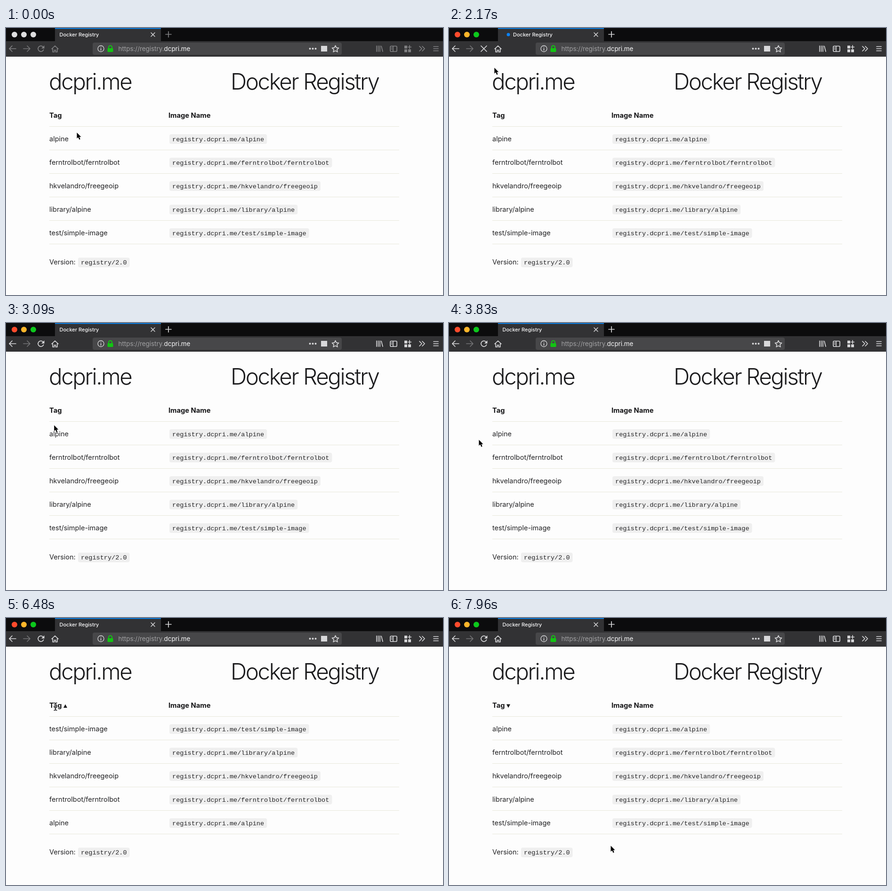
An HTML page for the animation above (8000 ms loop, 928x568 px).

```html
<!DOCTYPE html>
<html lang="en">
<head>
<meta charset="utf-8">
<title>Docker Registry</title>
<style>
  html, body { margin: 0; width: 100%; height: 100%; overflow: hidden; background: #fdfdfd; }
  svg { display: block; font-family: Inter, "Open Sans", sans-serif; font-optical-sizing: none; }
  text { white-space: pre; }
  .title { font-size: 47.5px; font-weight: 300; letter-spacing: -2.4px; fill: #1c1c1e; }
  .body { font-size: 14.5px; fill: #222224; }
  .head { font-size: 14.7px; font-weight: 700; fill: #161618; }
  .code { font: 13.55px "Liberation Mono", monospace; fill: #242426; }
  .pill { fill: #efefef; }
  .line { stroke: #e8e8dc; }
  .icon { fill: none; stroke: #d8d8da; stroke-width: 1.7; stroke-linecap: round; stroke-linejoin: round; }
  .solid { fill: #d8d8da; stroke: none; }
  .tool { color: #d8d8da; }
  .away .tool { color: #808082; }
  .tool .icon { stroke: currentColor; }
  .tool .solid { fill: currentColor; }
  .away .light { fill: #dededf; }
</style>
</head>
<body>
<svg id="stage" width="928" height="568" viewBox="0 0 928 568">
  <rect width="928" height="568" fill="#fdfdfd"/>

  <!-- window chrome -->
  <rect width="928" height="28" fill="#0c0c0d"/>
  <rect y="28" width="928" height="33" fill="#323234"/>
  <rect x="104" width="225" height="28" fill="#323234"/>
  <clipPath id="tab"><rect x="104" y="2" width="225" height="26"/></clipPath>
  <circle id="burst" cx="119" cy="14" fill="#0a84ff" clip-path="url(#tab)"/>
  <rect x="104" width="225" height="2" fill="#0a78d8"/>
  <circle id="throb" cy="14" r="3.5" fill="#0a84ff"/>
  <text id="tabName" y="18" font-size="11" font-weight="500" fill="#f9f9fa">Docker Registry</text>
  <path class="icon" style="stroke-width:1.5" d="M308 10l8 8m0-8l-8 8"/>
  <circle class="light" cx="18" cy="14" r="6" fill="#ff4b2c"/>
  <circle class="light" cx="38" cy="14" r="6" fill="#ffb62a"/>
  <circle class="light" cx="58" cy="14" r="6" fill="#0cc81c"/>

  <!-- toolbar -->
  <rect id="hover" x="60" y="30.5" width="28" height="27" rx="3"/>
  <g class="tool">
    <path class="icon" d="M339 13.500h12M345 7.500v12"/>
    <path class="icon" d="M21 44H7m6-6l-6 6l6 6"/>
    <g id="reload">
      <path class="icon" d="M79.700 46.200A6 6 0 1 1 78.300 39.800"/>
      <path class="solid" d="M81.500 37v6.500H75z"/>
    </g>
    <path class="icon" d="M97 44.500l7-6.500l7 6.500M99.200 44v7h3.300v-4h3v4h3.300v-7"/>
    <path class="icon" d="M787 38v12M790.500 38v12M794 38v12M797 38.500l3 11.500"/>
    <rect class="icon" x="816" y="38.500" width="14" height="11.500" rx="2"/>
    <path class="icon" d="M822 39v11M818.500 42h1M818.500 45h1"/>
    <path class="solid" d="M846 37.500h6v6h-6zM846 45.500h6v6h-6zM854 45.500h6v6h-6z"/>
    <path class="icon" d="M857 37v7M853.700 40.500h6.700"/>
    <path class="icon" d="M878 39l5 5l-5 5M884 39l5 5l-5 5"/>
    <path class="icon" d="M908 39.500h10M908 44h10M908 48.500h10"/>
  </g>
  <path id="forward" class="icon" style="stroke:#737375" d="M37 44h14m-6-6l6 6l-6 6"/>
  <path id="stop" class="icon" d="M68 38l12 12m0-12l-12 12"/>

  <!-- address field -->
  <rect x="184" y="31" width="529" height="26" rx="4" fill="#474749"/>
  <circle class="icon" style="stroke-width:1.300" cx="201.500" cy="44" r="6.500"/>
  <path class="icon" style="stroke-width:1.500" d="M201.500 43.500v4M201.500 40.700v.1"/>
  <rect x="215.500" y="43" width="12" height="8" rx="1.500" fill="#12c412"/>
  <path d="M218 43v-2a3.500 3.500 0 0 1 7 0v2" fill="none" stroke="#12c412" stroke-width="2"/>
  <text x="238.500" y="49" font-size="13.400" fill="#f9f9fa"><tspan fill="#a2a2a4">https://registry.</tspan>dcpri.me</text>
  <g class="solid">
    <circle cx="645.500" cy="44" r="2"/><circle cx="651.500" cy="44" r="2"/><circle cx="657.500" cy="44" r="2"/>
    <rect x="669" y="38" width="13" height="12"/>
  </g>
  <path id="star" class="icon" style="stroke-width:1.600"/>

  <!-- page -->
  <text class="title" x="91" y="130.500">dcpri.me</text>
  <text class="title" x="477" y="130.500">Docker Registry</text>
  <text class="head" x="92" y="191">Tag</text>
  <text class="head" x="345" y="191">Image Name</text>
  <path id="sort" fill="#161618"/>
  <g id="rows"></g>
  <text class="body" x="92" y="503">Version:</text>
  <g id="version"></g>

  <path id="arrow" d="M0 0V12.500L2.900 9.900L5 15L7.300 14L5.200 9.200H9Z" fill="#000" stroke="#fff" stroke-width="1.200" paint-order="stroke" stroke-linejoin="round"/>
  <g id="beam" fill="none">
    <path id="beamEdge" stroke="#fff" stroke-width="3"/>
    <path id="beamCore" stroke="#18181a" stroke-width="1.400"/>
  </g>
</svg>
<script>
const LOOP = 8000;
const FOCUS = 870, PRESS = 1430, LOAD = 1540, DONE = 2455, READY = 3000;
const SORT_DOWN = 4960, SORT_UP = 5520, SORT_DOWN_AGAIN = 6520;
const CHAR = 8.13;
const NS = "http://www.w3.org/2000/svg";
const $ = id => document.getElementById(id);

function add(parent, tag, attrs, text) {
  const el = document.createElementNS(NS, tag);
  for (const k in attrs) el.setAttribute(k, attrs[k]);
  if (text) el.textContent = text;
  return parent.appendChild(el);
}

function addCode(parent, x, y, text) {
  add(parent, "rect", { class: "pill", x, y: y - 14.5, width: text.length * CHAR + 12, height: 20.5, rx: 4 });
  add(parent, "text", { class: "code", x: x + 6, y }, text);
}

const images = ["alpine", "ferntrolbot/ferntrolbot", "hkvelandro/freegeoip", "library/alpine", "test/simple-image"];
const rows = images.map(name => {
  const row = add($("rows"), "g", {});
  add(row, "text", { class: "body", x: 92, y: 240.5 }, name);
  addCode(row, 347, 240.5, "registry.dcpri.me/" + name);
  return row;
});
for (let i = 0; i < 6; i++) {
  add($("stage"), "path", { class: "line", d: `M92 ${209.5 + i * 50}H835` });
}
addCode($("version"), 153, 503, "registry/2.0");

const star = Array.from({ length: 10 }, (_, i) => {
  const r = i % 2 ? 3.6 : 7.5, a = -Math.PI / 2 + i * Math.PI / 5;
  return `${699.5 + r * Math.cos(a)} ${44.8 + r * Math.sin(a)}`;
});
$("star").setAttribute("d", `M${star.join("L")}Z`);

const beam = "M-3.500 -8Q0 -8 0 -5.500Q0 -8 3.500 -8M0 -6V6M-3.500 8Q0 8 0 5.500Q0 8 3.500 8M-2 3H2";
$("beamEdge").setAttribute("d", beam);
$("beamCore").setAttribute("d", beam);
$("stage").append($("arrow"), $("beam"));

// pointer path: time, x, y
const path = [
  [0, 150, 222], [40, 150, 222], [450, 112, 130], [800, 77, 49], [1850, 77, 49],
  [2200, 98, 88], [2520, 124, 139], [3000, 108, 205], [3450, 72, 256], [3830, 63, 248],
  [4250, 70, 205], [4650, 90, 170], [4860, 104, 188], [7300, 104, 188],
  [7600, 215, 345], [7920, 343, 484], [8000, 343, 484]
];

const still = (a, b) => !a || !b || (a[1] === b[1] && a[2] === b[2]);

function slope(i, axis) {
  const a = path[i - 1], p = path[i], b = path[i + 1];
  return still(a, p) || still(p, b) ? 0 : (b[axis] - a[axis]) / (b[0] - a[0]);
}

function pointer(t) {
  let i = 0;
  while (i < path.length - 2 && t >= path[i + 1][0]) i++;
  const a = path[i], b = path[i + 1], span = b[0] - a[0];
  const u = (t - a[0]) / span, v = 1 - u;
  return [1, 2].map(k =>
    a[k] * v * v * (1 + 2 * u) + b[k] * u * u * (1 + 2 * v) +
    span * u * v * (slope(i, k) * v - slope(i + 1, k) * u));
}

const inside = (x, y, l, t, r, b) => x >= l && x <= r && y >= t && y <= b;
const show = (id, on) => { $(id).style.display = on ? "" : "none"; };

function drawTab(t) {
  const loading = t >= LOAD && t < DONE;
  $("tabName").setAttribute("x", loading ? 136 : 113.5);
  show("throb", loading);
  $("throb").setAttribute("cx", 122 - 5 * Math.cos((t - LOAD) / 1050 * 2 * Math.PI));
  const k = (t - DONE) / 375;
  const on = k >= 0 && k < 1;
  show("burst", on);
  if (on) {
    $("burst").setAttribute("r", 6 + 160 * k * (1 - .4 * k));
    $("burst").setAttribute("opacity", .5 * (1 - k));
  }
}

function drawReload(t, x, y) {
  const busy = t >= LOAD && t < READY;
  show("reload", !busy);
  show("stop", busy);
  $("stop").style.stroke = t < DONE ? "#d8d8da" : "#737375";
  show("hover", t >= FOCUS && t < DONE && inside(x, y, 60, 30, 88, 58));
  $("hover").setAttribute("fill", t >= PRESS && t < LOAD ? "#727274" : "#4a4a4c");
}

function drawTable(t) {
  const up = t >= SORT_UP && t < SORT_DOWN_AGAIN;
  rows.forEach((row, i) => row.setAttribute("transform", `translate(0 ${50 * (up ? 4 - i : i)})`));
  show("sort", t >= SORT_DOWN);
  $("sort").setAttribute("d", up ? "M122 191h8l-4-7.500z" : "M122 183.500h8l-4 7.500z");
}

function drawPointer(x, y) {
  const text = inside(x, y, 92, 177, 119, 196) || inside(x, y, 92, 88, 267, 136);
  show("arrow", !text);
  show("beam", text);
  $("arrow").setAttribute("transform", `translate(${x + .5} ${y + .5})`);
  $("beam").setAttribute("transform", `translate(${x + 1} ${y + .5})`);
}

function frame(now) {
  const t = now % LOOP;
  const [x, y] = pointer(t);
  $("stage").classList.toggle("away", t < FOCUS);
  drawTab(t);
  drawReload(t, x, y);
  drawTable(t);
  drawPointer(x, y);
  requestAnimationFrame(frame);
}
frame(0);
</script>
</body>
</html>
```
